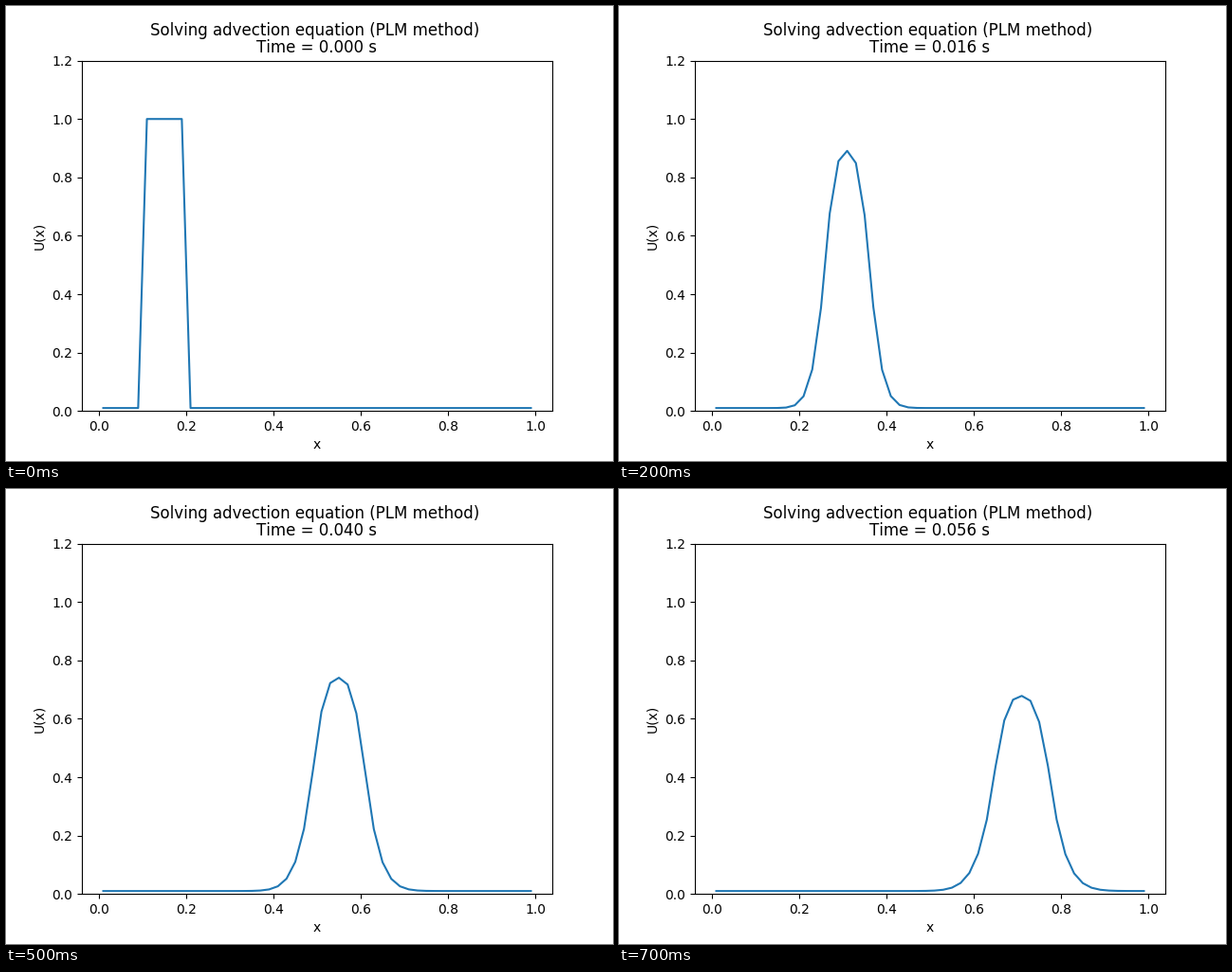
Recreate the animation shown at these times as a matplotlib script. Size 640 px wide and 480 px high, loop 800 ms.

```python
import numpy as np
import matplotlib.pyplot as plt
from matplotlib.animation import FuncAnimation

CELLS = 50
SPEED = 10.0
COURANT = 0.4
STEPS_PER_FRAME = 10
FRAMES = 8

dx = 1 / CELLS
dt = COURANT * dx / SPEED
x = (np.arange(CELLS) + 0.5) * dx


def minmod(a, b):
    smaller = np.where(np.abs(a) < np.abs(b), a, b)
    return np.where(a * b > 0, smaller, 0.0)


def advance(u):
    """One piecewise-linear upwind step on a periodic grid."""
    slope = minmod(u - np.roll(u, 1), np.roll(u, -1) - u)
    face = u + 0.5 * (1 - COURANT) * slope
    return u - COURANT * (face - np.roll(face, 1))


def solve():
    u = np.where((x > 0.1) & (x < 0.2), 1.0, 0.01)
    states = [u]
    for _ in range(FRAMES - 1):
        for _ in range(STEPS_PER_FRAME):
            u = advance(u)
        states.append(u)
    return states


states = solve()

plt.rcParams["text.kerning_factor"] = 6  # whole-pixel kerning
fig, ax = plt.subplots(figsize=(6.4, 4.8), dpi=100)
line, = ax.plot(x, states[0])
ax.set_ylim(0, 1.2)
ax.set_xlabel("x")
ax.set_ylabel("U(x)")


def update(frame):
    line.set_ydata(states[frame])
    time = frame * STEPS_PER_FRAME * dt
    ax.set_title(f"Solving advection equation (PLM method) \nTime = {time:.3f} s",
                 linespacing=1.0)
    return line, ax.title


anim = FuncAnimation(fig, update, frames=FRAMES, interval=100,
                     repeat=True, repeat_delay=0, blit=False)

plt.show()
```
